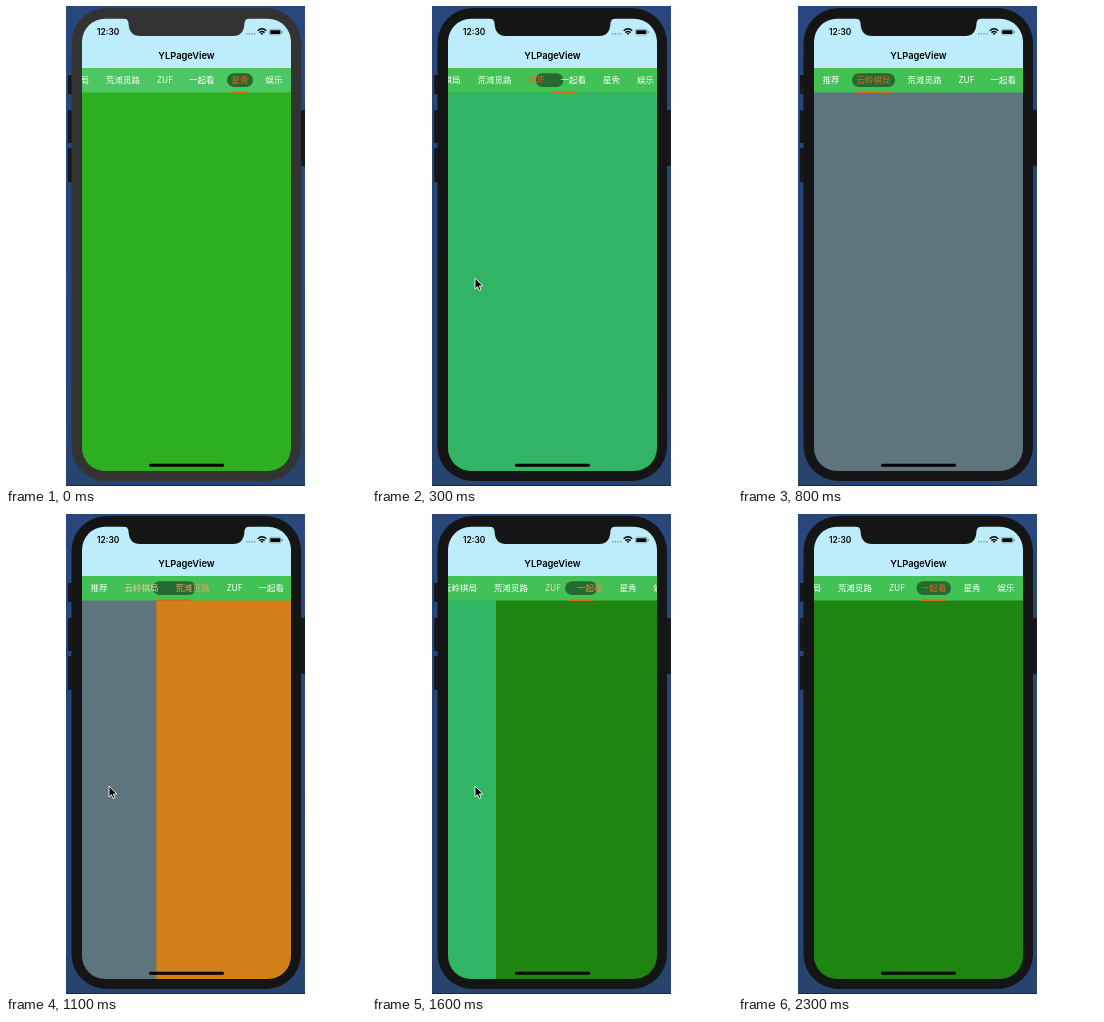
Write an HTML page that moves like this. It is 360 px wide and 480 px high and loops after 2.4 s.

```html
<!DOCTYPE html>
<html lang="zh">
<head>
<meta charset="utf-8">
<style>
html, body { margin: 0; width: 100%; height: 100%; overflow: hidden; background: #fff; }
svg { display: block; width: 100%; height: 100%; }
text { font-family: Inter, Roboto, sans-serif; font-weight: 600; }
#tabs text { font: 400 8.5px "Noto Sans CJK SC", "Noto Sans CJK", sans-serif; }
.case { fill: #151515; }
.bar { fill: #42c255; }
.pale .case { fill: #333; }
.pale .bar { fill: #4dc763; }
</style>
</head>
<body>
<svg id="stage" viewBox="0 0 360 480">
  <defs>
    <linearGradient id="desk" x2="0" y2="1">
      <stop stop-color="#28477d"/><stop offset="1" stop-color="#27446f"/>
    </linearGradient>
    <clipPath id="view"><rect x="60" width="239" height="480"/></clipPath>
    <clipPath id="glass"><rect x="76" y="12.7" width="209" height="452.3" rx="23"/></clipPath>
  </defs>
  <g clip-path="url(#view)">
    <rect x="60" width="239" height="480" fill="url(#desk)"/>
    <path d="M60 479.5H299" stroke="#16294c"/>
    <path d="M64 69v19M64 104v33M64 142v34M297 104v56" stroke="#16181c" stroke-width="4"/>
    <rect class="case" x="65.5" y="2" width="229.5" height="473" rx="35"/>
    <g clip-path="url(#glass)">
      <rect x="76" y="12" width="209" height="50" fill="#bdedfa"/>
      <g id="pages"></g>
      <rect class="bar" x="76" y="62" width="209" height="24.5"/>
      <rect id="pill" y="67.2" height="13.8" rx="6.9" fill="#256b31"/>
      <g id="tabs"></g>
      <rect id="line" y="85.5" height="1.5" fill="#e0671c"/>
    </g>
    <path class="case" d="M118 11V12.7Q122 12.7 122.5 17Q123 30 134 30H227Q238 30 238.5 17Q239 12.7 243 12.7V11Z"/>
    <text x="91" y="28.9" font-size="8.4">12:30</text>
    <text x="180.5" y="52.9" font-size="9.3" text-anchor="middle">YLPageView</text>
    <path d="M240 27.8h9.5" stroke="#7d9ca5" stroke-width="1.4" stroke-dasharray="1.4 1.3"/>
    <path d="M251.7 24.7Q256 20.9 260.3 24.7M253.4 26.6Q256 24.4 258.6 26.6" fill="none" stroke="#000" stroke-width="1.4"/>
    <path d="M254.6 27.6Q256 26.6 257.4 27.6L256 29Z"/>
    <rect x="263.3" y="23.3" width="12" height="5.6" rx="1.6" fill="none" stroke="#6c888f" stroke-width=".6"/>
    <rect x="264.2" y="24.2" width="10.2" height="3.8" rx=".8"/>
    <rect x="276" y="25.1" width="1" height="2" rx=".5" fill="#6c888f"/>
    <rect x="143" y="457.8" width="75" height="3" rx="1.5"/>
    <path id="cursor" d="M0 0V11L2.5 8.7L4.2 12.6L6.1 11.8L4.4 8H7.8Z" stroke="#fff" stroke-width=".9"/>
  </g>
</svg>
<script>
const LOOP = 2400, STEP = 100, LEFT = 76, WIDTH = 209, GAP = 17, FIRST = 5;
const labels = ["推荐", "云岭棋局", "荒滩觅路", "ZUF", "一起看", "星秀", "娱乐"];
const colors = ["#5e757e", "#5e757e", "#d17f19", "#31b565", "#1e8510", "#2cb01f", "#2cb01f"];

const $ = id => document.getElementById(id);
const mix = (a, b, k) => a + (b - a) * k;
const clamp = (v, min = 0, max = 1) => Math.min(max, Math.max(min, v));

// Four taps walk back through the tabs, then three swipes go forward again.
const taps = [4, 3, 2, 1].map((to, i) => ({ to, at: i * 200, span: 200, tap: true }));
const swipes = [1030, 1240, 1507].map((at, i) => ({ to: i + 2, at, span: 240 }));
const moves = [...taps, ...swipes];

// Pointer stops: time, x, y.
const stops = [[0, 194.5, 75], [300, 162.5, 71.3], [800, 131.3, 80], [1100, 109, 216],
  [1400, 123.5, 261], [1600, 103, 272], [1900, 40, 290]];

function set(el, attrs) {
  for (const name in attrs) el.setAttribute(name, attrs[name]);
}

function add(parent, tag, attrs) {
  const el = document.createElementNS("http://www.w3.org/2000/svg", tag);
  set(el, attrs);
  return $(parent).appendChild(el);
}

let next = LEFT + GAP / 2;
const tabs = labels.map((label, i) => {
  const el = add("tabs", "text", { y: 77.3 });
  el.textContent = label;
  const tab = { el, x: next, w: i === 3 ? 15 : label.length * 8.5 };
  next += tab.w + GAP;
  return tab;
});
const maxScroll = next - GAP / 2 - LEFT - WIDTH;
const sheets = colors.map(fill => add("pages", "rect", { y: 86, width: WIDTH + 0.5, height: 380, fill }));

// Fractional tab index; swipes always ease out, taps use the given easing.
function follow(t, tapEase) {
  return moves.reduce((pos, m) => {
    const u = clamp((t - m.at) / m.span);
    return mix(pos, m.to, m.tap ? tapEase(u) : 1 - (1 - u) ** 3);
  }, FIRST);
}

const centred = i => clamp(tabs[i].x + tabs[i].w / 2 - LEFT - WIDTH / 2, 0, maxScroll);

// The bar centres a tapped tab at once, a swiped one after its page arrives.
function scroll(t) {
  return moves.reduce((x, m) => {
    const u = m.tap ? (t - m.at) / m.span : (t - m.at - m.span) / 120;
    return mix(x, centred(m.to), clamp(u) ** 2);
  }, centred(FIRST));
}

function pointer(t) {
  const [, ...spot] = stops.reduce((a, b) => {
    const k = clamp((t - a[0]) / (b[0] - a[0]));
    return k < 1 ? [Infinity, mix(a[1], b[1], k), mix(a[2], b[2], k)] : b;
  });
  return spot;
}

// Spans the tab at a fractional index, with padding on both sides.
function span(id, pos, shift, pad) {
  const a = tabs[Math.floor(pos)], b = tabs[Math.ceil(pos)], k = pos % 1;
  set($(id), { x: mix(a.x, b.x, k) - shift - pad, width: mix(a.w, b.w, k) + 2 * pad });
}

function draw(now) {
  const t = Math.floor(now % LOOP / STEP) * STEP;
  const page = follow(t, Math.ceil), shift = scroll(t);
  $("stage").classList.toggle("pale", t < STEP);
  sheets.forEach((el, i) => set(el, { x: LEFT + (i - page) * WIDTH }));
  tabs.forEach((tab, i) => {
    const k = clamp(1 - Math.abs(i - page));
    set(tab.el, { x: tab.x - shift, fill: `rgb(${mix(250, 222, k)},${mix(255, 104, k)},${mix(250, 20, k)})` });
  });
  span("pill", follow(t, u => u ** 0.65), shift, 4.5);
  span("line", follow(t, u => u * u), shift, 0);
  set($("cursor"), { transform: `translate(${pointer(t)})` });
}

const start = performance.now();
function tick() {
  draw(performance.now() - start);
  requestAnimationFrame(tick);
}
tick();
</script>
</body>
</html>
```
